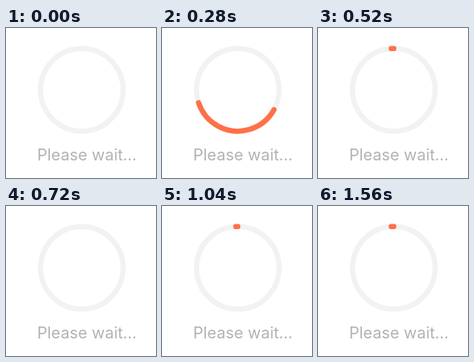
These frames come from a looping animation (188 px wide and 188 px high, 1.64 s). An HTML page with a canvas:

```html
<!DOCTYPE html>
<html lang="en">
<head>
<meta charset="utf-8">
<title>Please wait</title>
<style>
  html, body { margin: 0; width: 100%; height: 100%; overflow: hidden; background: #fff; }
  canvas { display: block; }
</style>
</head>
<body>
<canvas id="stage" width="188" height="188"></canvas>
<script>
const ctx = document.getElementById('stage').getContext('2d');
const LOOP = 1640, STEP = 40;
const CENTER = { x: 95, y: 77.5 }, RADIUS = 51.75, WEIGHT = 6.5;
const TAIL_START = 160, TAIL_END = 520, TAIL_REST = 0.99;

const clamp = v => Math.min(1, Math.max(0, v));

const headAt = t => clamp(t / 400);

// Linear run, then a damped spring around the resting point.
function tailAt(t) {
  if (t <= TAIL_END) return TAIL_REST * clamp((t - TAIL_START) / (TAIL_END - TAIL_START));
  const s = (t - TAIL_END) / 1000;
  return clamp(TAIL_REST + 0.0735 * Math.sin(2 * Math.PI * 6 * s) * Math.exp(-6 * s));
}

function strokeArc(from, to, color) {
  const angle = v => (v - 0.25) * 2 * Math.PI;
  ctx.strokeStyle = color;
  ctx.beginPath();
  ctx.arc(CENTER.x, CENTER.y, RADIUS, angle(from), angle(to));
  ctx.stroke();
}

function draw(t) {
  ctx.fillStyle = '#fff';
  ctx.fillRect(0, 0, 188, 188);
  ctx.lineWidth = WEIGHT;
  ctx.lineCap = 'round';
  strokeArc(0, 1, '#f2f2f2');

  const head = headAt(t), tail = tailAt(t);
  if (head - tail > 1e-6) strokeArc(tail, head, '#ff7046');

  ctx.fillStyle = '#b2b2b2';
  ctx.font = '20px Inter, "Noto Sans", sans-serif';
  ctx.fillText('Please wait...', 39, 166);
}

function tick() {
  const t = performance.now() % LOOP;
  draw(Math.floor(t / STEP) * STEP);
  requestAnimationFrame(tick);
}
tick();
</script>
</body>
</html>
```
